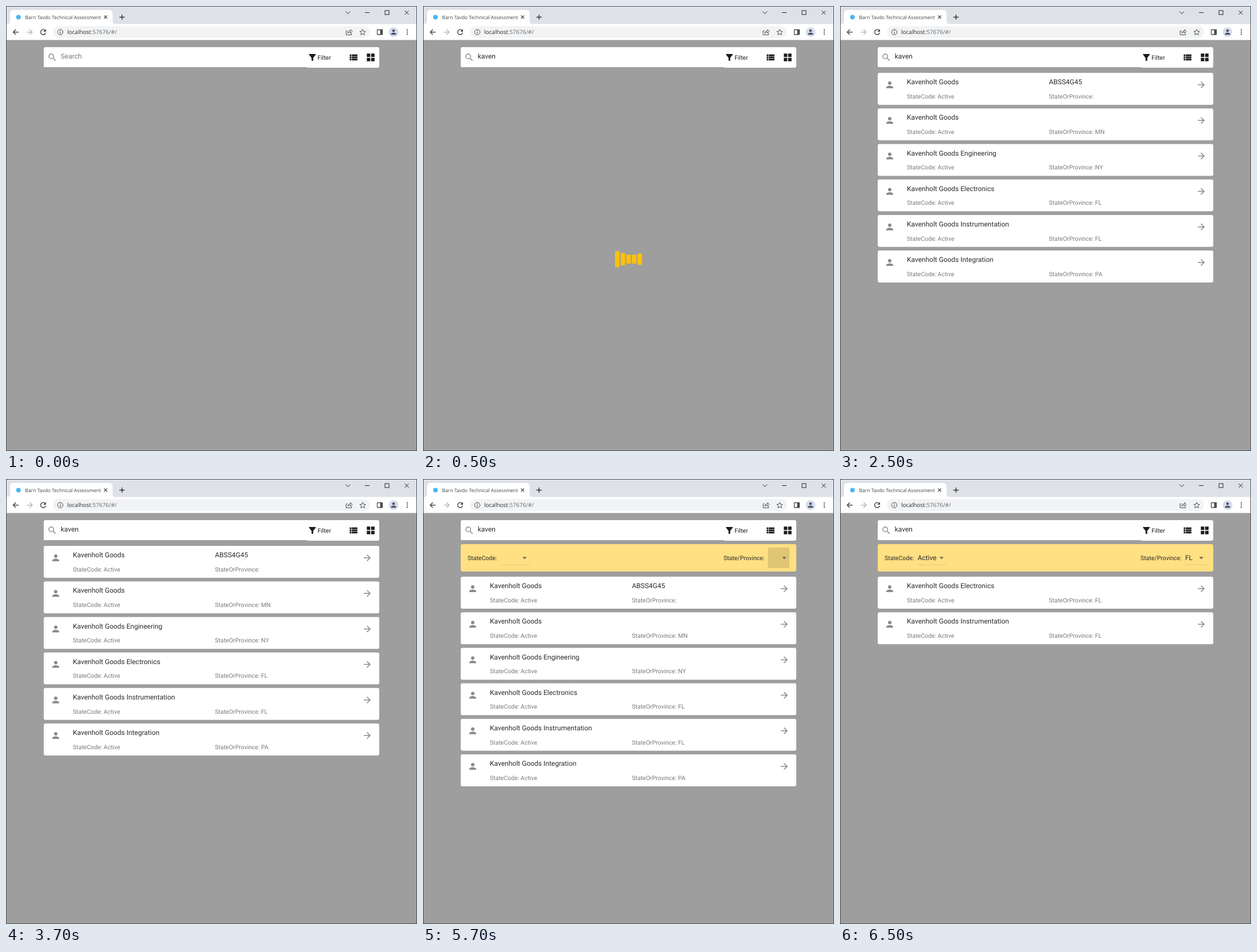
An HTML page that plays this animation: 719x779 px, repeating every 8000 ms.

```html
<!DOCTYPE html>
<html lang="en">
<head>
<meta charset="utf-8">
<title>Account search</title>
<style>
  html, body { margin: 0; width: 100%; height: 100%; overflow: hidden; background: #9e9e9e; }
  svg { display: block; width: 719px; height: 779px; }
  text { font-family: Roboto, Arial, sans-serif; text-rendering: geometricPrecision; white-space: pre; }
  .ui { font-family: "Open Sans", "Noto Sans", sans-serif; }
  .card { filter: drop-shadow(0 .75px .75px rgba(0, 0, 0, .3)); }
  .line { fill: none; stroke: #4a4d51; stroke-width: 1.2; }
</style>
</head>
<body>
<svg viewBox="0 0 719 779" xmlns="http://www.w3.org/2000/svg">
  <rect width="719" height="779" fill="#9e9e9e"/>
  <rect width="719" height="32" fill="#dee1e6"/>
  <rect y="31.5" width="719" height="28" fill="#fff"/>
  <path d="M1 32q6 0 6-6V13q0-6 6-6h167.500q6 0 6 6v13q0 6 6 6z" fill="#fff"/>
  <circle cx="21.800" cy="19.500" r="4" fill="#47b5f6"/>
  <text class="ui" x="33.500" y="22.700" font-size="8.500" fill="#3c4043">Barn Tavdo Technical Assessment</text>
  <path class="line" d="M171.500 16.700l5.500 5.500m0-5.500l-5.500 5.500" style="stroke:#303236"/>
  <path class="line" d="M198.500 19.500h9m-4.500-4.500v9" style="stroke:#303236;stroke-width:1.400"/>
  <g class="line" style="stroke:#222;stroke-width:1">
    <path d="M594 9.500l4 4 4-4"/>
    <path d="M628 11.500h8"/>
    <rect x="663" y="8" width="7" height="7"/>
    <path d="M697.500 8l7 7m0-7l-7 7"/>
  </g>

  <g class="line" style="stroke-width:1.500">
    <path d="M22 45.700H12.700m4.500-4.600l-4.600 4.600 4.600 4.600"/>
    <path d="M36.500 45.700h9.300m-4.500-4.600l4.600 4.600-4.600 4.600" style="stroke:#b8babd"/>
    <path d="M68.300 42.500a4.500 4.500 0 1 0 1.200 4.200"/>
  </g>
  <path d="M70 40.300v4.700h-4.700z" fill="#4a4d51"/>
  <rect x="82" y="35.200" width="555" height="20.800" rx="10.400" fill="#f1f3f4"/>
  <circle class="line" cx="95" cy="45.700" r="4.700" style="stroke-width:1"/>
  <path class="line" d="M95 45v3.300m0-5.500v1.200"/>
  <text class="ui" x="107" y="49.300" font-size="10" fill="#2a2c30">localhost<tspan fill="#686c71">:57676/#/</tspan></text>
  <g class="line" style="stroke-width:1">
    <path d="M597.500 43.500h-2.500v7h9.500v-2.500M597.800 48c.4-3.200 2.200-4.500 5-4.500v-2.300l3 3.300-3 3.300v-2.200c-2.200 0-3.600.6-5 2.400z"/>
    <path d="M624 40.900l1.500 3.300 3.600.4-2.700 2.400.8 3.600-3.200-1.900-3.200 1.900.8-3.600-2.700-2.400 3.600-.4z"/>
    <rect x="649.500" y="41.500" width="9" height="8.500" rx=".5" style="stroke-width:1.300"/>
  </g>
  <rect x="654.500" y="41.500" width="4" height="8.500" fill="#4a4d51"/>
  <circle cx="678" cy="45.700" r="8.500" fill="#d7dbea"/>
  <circle cx="678" cy="43.300" r="2.300" fill="#47506a"/>
  <path d="M673.500 50.200v-.9q0-2.500 4.500-2.500t4.500 2.500v.9z" fill="#47506a"/>
  <g fill="#4a4d51">
    <circle cx="702" cy="41.900" r="1.150"/><circle cx="702" cy="45.700" r="1.150"/><circle cx="702" cy="49.500" r="1.150"/>
  </g>

  <rect class="card" x="66" y="72" width="587" height="36" rx="3" fill="#fff"/>
  <path d="M67 107.500h460" stroke="#8c8c8c" stroke-width=".8"/>
  <g id="bar"></g>
  <g id="page"></g>
  <rect x=".5" y=".5" width="718" height="778" fill="none" stroke="#4c4e51"/>
</svg>
<script>
const LOOP = 8000;
const INK = '#2b2b2b', SOFT = '#7a7a7a', GLYPH = '#8a8a8a', BLACK = '#1c1c1c';
const ICONS = {
  search: 'M15.500 14h-.79l-.28-.27A6.470 6.470 0 0 0 16 9.500 6.500 6.500 0 1 0 9.500 16c1.610 0 3.090-.59 4.230-1.570l.27.28v.79l5 4.990L20.490 19zm-6 0a4.500 4.500 0 1 1 0-9 4.500 4.500 0 0 1 0 9z',
  filter: 'M4.250 5.610C6.270 8.200 10 13 10 13v6q0 1 1 1h2q1 0 1-1v-6s3.720-4.800 5.740-7.390A1 1 0 0 0 18.950 4H5.040c-.83 0-1.300.95-.79 1.610z',
  list: 'M3 5h4v4H3zm5 0h13v4H8zM3 10h4v4H3zm5 0h13v4H8zM3 15h4v4H3zm5 0h13v4H8z',
  grid: 'M3 3h8v8H3zm10 0h8v8h-8zM3 13h8v8H3zm10 0h8v8h-8z',
  person: 'M12 12a4 4 0 1 0 0-8 4 4 0 0 0 0 8zm0 2c-2.670 0-8 1.340-8 4v2h16v-2c0-2.660-5.330-4-8-4z',
  next: 'M12 4l-1.410 1.410L16.170 11H4v2h12.170l-5.580 5.590L12 20l8-8z',
  drop: 'M7 10l5 5 5-5z'
};

const text = (x, y, size, fill, str) =>
  `<text x="${x}" y="${y}" font-size="${size}" fill="${fill}">${str}</text>`;
const rect = (x, y, w, h, fill, extra = '') =>
  `<rect x="${x}" y="${y}" width="${w}" height="${h}" fill="${fill}" ${extra}/>`;
const card = (y, h, fill) => rect(66, y, 587, h, fill, 'rx="3" class="card"');
// Icons live on a 24-unit grid, shown at three quarters and centred on (x, y).
const icon = (name, x, y, fill) =>
  `<path d="${ICONS[name]}" fill="${fill}" transform="translate(${x - 9} ${y - 9}) scale(.75)"/>`;

const firm = (suffix, state, code = '') => ({ name: ('Kavenholt Goods ' + suffix).trim(), state, code });
const firms = [
  firm('', '', 'ABSS4G45'),
  firm('', 'MN'),
  firm('Engineering', 'NY'),
  firm('Electronics', 'FL'),
  firm('Instrumentation', 'FL'),
  firm('Integration', 'PA')
];

const row = (f, y) => card(y, 56, '#fff') +
  icon('person', 87, y + 21, GLYPH) +
  text(117, y + 20.2, 12, INK, f.name) +
  text(365.5, y + 20.2, 12, INK, f.code) +
  text(117, y + 44.7, 10.5, SOFT, 'StateCode: Active') +
  text(365.5, y + 44.7, 10.5, SOFT, 'StateOrProvince: ' + f.state) +
  icon('next', 632, y + 21, GLYPH);

const rows = (items, top) => items.map((f, i) => row(f, top + i * 62.2)).join('');

const select = (x, w, value) =>
  rect(x, 149.7, w, .8, '#d9c17c') +
  text(x, 142.3, 12, INK, value) +
  icon('drop', x + w - 9, 138, '#68645a');

const filters = (code, state, focus) => card(114, 48, '#ffe082') +
  text(78, 141.7, 10.5, INK, 'StateCode:') +
  text(525.7, 141.7, 10.5, INK, 'State/Province:') +
  (focus ? rect(603.5, 120, 37.5, 36, '#e0c573') : '') +
  select(135.7, 51, code) +
  select(603.7, 37.3, state);

const loader = () => [28, 21.5, 15.5, 15.5, 19.5]
  .map((h, i) => rect(336 + i * 9.85, 443.2 - h / 2, 7.8, h, '#ffc107')).join('');

const scenes = [
  { at: 0, query: '', body: '' },
  { at: 500, query: 'kaven', body: loader() },
  { at: 2500, query: 'kaven', body: rows(firms, 117) },
  { at: 4500, query: 'kaven', body: filters('', '', true) + rows(firms, 171) },
  { at: 6500, query: 'kaven',
    body: filters('Active', 'FL', false) + rows(firms.filter(f => f.state === 'FL'), 171) }
];

const bar = document.getElementById('bar');
const page = document.getElementById('page');

const toolbar = query =>
  icon('search', 81, 90, GLYPH) +
  text(95.7, 92.2, 12, query ? INK : '#777', query || 'Search') +
  icon('filter', 536, 90, BLACK) +
  text(545, 93.7, 10.5, BLACK, 'Filter') +
  icon('list', 608, 90, BLACK) +
  icon('grid', 638, 90, BLACK);

let shown = null;
function draw() {
  const t = performance.now() % LOOP;
  const scene = scenes.filter(s => s.at <= t).pop();
  if (scene !== shown) {
    bar.innerHTML = toolbar(scene.query);
    page.innerHTML = scene.body;
    shown = scene;
  }
  requestAnimationFrame(draw);
}
draw();
</script>
</body>
</html>
```
